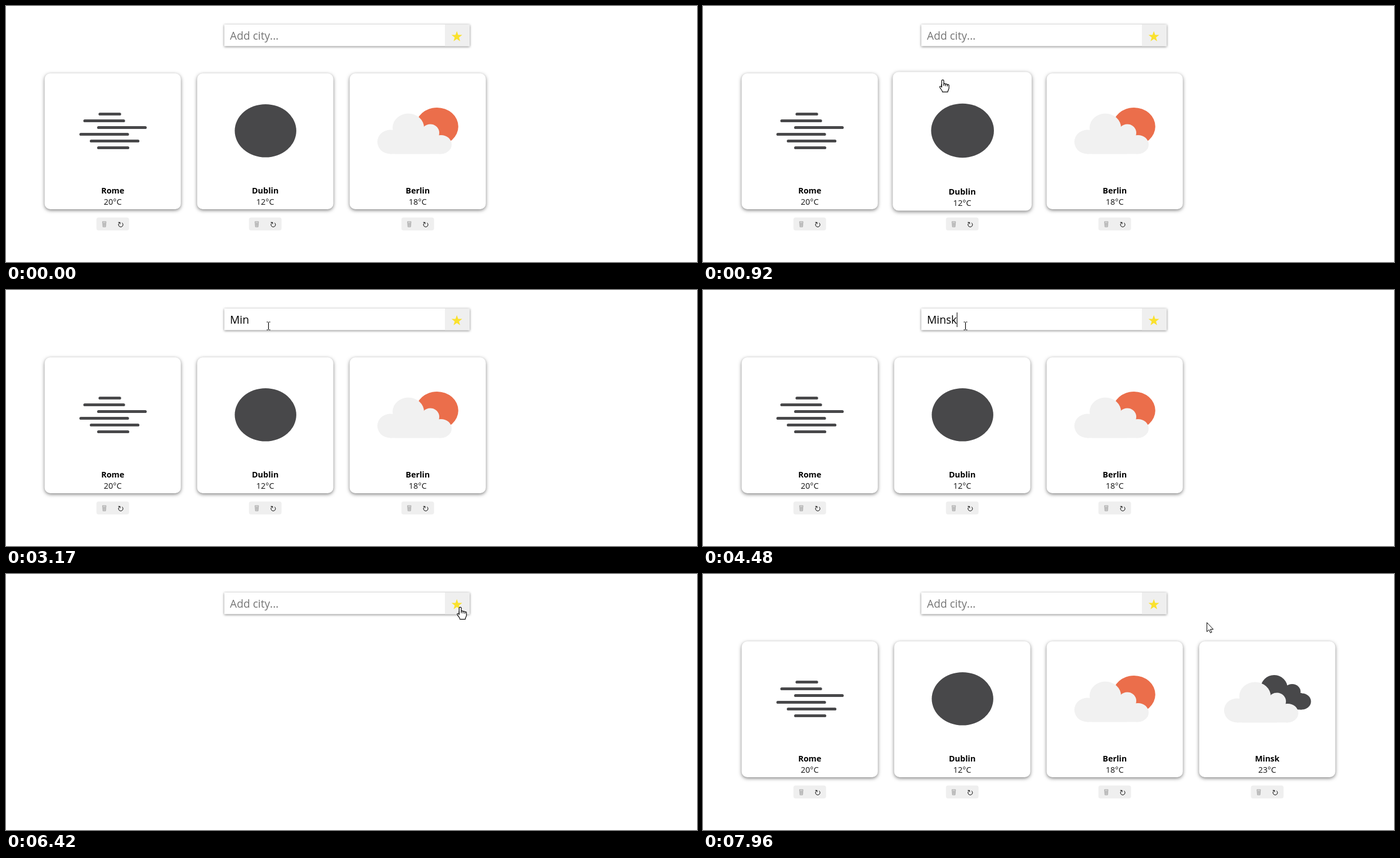
These frames come from a looping animation (1228 by 456 pixels, 8 s). An HTML page:

```html
<!DOCTYPE html>
<html lang="en">
<head>
<meta charset="utf-8">
<title>City weather</title>
<style>
  html, body { margin: 0; width: 100%; height: 100%; overflow: hidden; background: #fff; }
  svg { display: block; width: 100%; height: 100%; font-family: "Open Sans", sans-serif; font-kerning: none; }
  .panel { fill: #fff; filter: drop-shadow(0 2px 3.4px rgba(0, 0, 0, .5)); }
  .field { fill: #fff; filter: drop-shadow(0 1.5px 2.3px rgba(0, 0, 0, .5)); }
  .grey { fill: #efefef; }
  .dark { fill: #48484a; }
  .pale { fill: #f1f1f1; }
  .sun { fill: #eb6e4b; }
  .fog { stroke: #48484a; stroke-width: 5.2; stroke-linecap: round; }
  .label { font-size: 14.4px; text-anchor: middle; fill: #111; }
  .name { font-weight: 700; fill: #000; }
  .entry { font-size: 19.2px; }
  .line { fill: none; stroke: #000; }
  .bin { fill: #d8d8d8; stroke: #999; stroke-width: .8; }
  .pointer { fill: #fff; stroke: #000; stroke-linejoin: round; }
</style>
</head>
<body>
<svg viewBox="0 0 1228 456">
  <rect class="field" x="388" y="33" width="436" height="38.5"/>
  <rect class="grey" x="780" y="33" width="44" height="38.5"/>
  <polygon id="star" fill="#fae12d"/>
  <text id="entry" class="entry" x="398" y="60"></text>
  <rect id="caret" y="40" width="1" height="26"/>
  <g id="cards"></g>
  <g id="cursor">
    <path id="arrow" class="pointer" d="M0 0V16.3L3.8 12.8L6.2 18.3L8.6 17.3L6.2 12H11.3Z"/>
    <g id="hand" class="pointer" stroke-width="1.2">
      <path d="M-2 2C-2 -.2 1.8 -.2 1.8 2V8C2 6.5 5 6.6 5 8.5C5.3 7.2 8 7.4 8.2 9.2C8.6 8.2 11 8.4 11 10.5V15C11 17 9 19 8.8 22H-.5C-.8 19 -3.5 17 -5.2 13.8C-6.3 11.6 -3.8 10.8 -2 13.5Z"/>
      <path class="line" d="M-2 12V8M1.8 8V11M5 8.5V11.5M8.2 9.2V12"/>
    </g>
    <path id="beam" class="line" stroke-width="1.2" d="M-3.2 -7H-.8M.8 -7H3.2M0 -6.5V6.5M-3.2 7H-.8M.8 7H3.2"/>
  </g>
</svg>
<script>
const LOOP = 8000, STEP = 76.5, BLINK = 535;
const PITCH = 271, MID = 189.7, CARD = { x: 68.7, y: 120, size: 242 };
const CLICK = 1460, SUBMIT = 6030, CLEAR = 6260, RELOAD = 6570;
const $ = id => document.getElementById(id);

const ellipse = (cls, cx, cy, rx, ry) =>
  `<ellipse class="${cls}" cx="${cx}" cy="${cy}" rx="${rx}" ry="${ry}"/>`;
const box = (cls, x, y, w, h, r = 0) =>
  `<rect class="${cls}" x="${x}" y="${y}" width="${w}" height="${h}" rx="${r}"/>`;

const cloud = (dx, dy) => `<g transform="translate(${dx} ${dy})">` +
  ellipse('pale', 141, 242, 23, 21.5) + ellipse('pale', 173, 217, 28, 25.5) +
  ellipse('pale', 212, 226, 16, 15.5) + ellipse('pale', 231, 246.7, 19, 16.8) +
  box('pale', 150, 222, 62, 41.5) + box('pale', 141, 234, 90, 29.5) + '</g>';

// Bars as [left end, length].
const mist = () => [[167, 35], [140, 69], [164.5, 83], [133, 83], [151.5, 83], [164.5, 52]]
  .map(([x, w], i) => `<path class="fog" d="M${x} ${192.5 + 12 * i}h${w}"/>`).join('');
const moon = () => ellipse('dark', 190.2, 222.3, 54.7, 47.3);
const sunny = () => ellipse('sun', 224, 214.7, 37.8, 33.7) + cloud(0, 0);
const cloudy = () => ellipse('dark', 202, 204, 24, 24) + ellipse('dark', 234, 210, 15, 14) +
  ellipse('dark', 251, 227, 16.5, 14.5) + box('dark', 202, 212, 49, 29.5) + cloud(-5, 1);

const cities = [['Rome', 20, mist], ['Dublin', 12, moon], ['Berlin', 18, sunny], ['Minsk', 23, cloudy]];

$('cards').innerHTML = cities.map(([name, degrees, icon], i) => `
  <g transform="translate(${PITCH * i} 0)">
    <g class="body">
      ${box('panel', CARD.x, CARD.y, CARD.size, CARD.size, 10)}
      ${icon()}
      <text class="label name" x="${MID}" y="334">${name}</text>
      <text class="label" x="${MID}" y="354">${degrees}°C</text>
    </g>
    ${box('grey', 160.7, 376.7, 58, 23, 4)}
    <path class="bin" d="M171.5 384H177.8L177 393.5H172.3ZM173.7 386V392M175.7 386V392"/>
    <path class="line" d="M206.3 386.3A4 4 0 1 1 201.7 386.2M199.5 385.4H202.8V388.4"/>
  </g>`).join('');

const groups = [...$('cards').children];
const bodies = groups.map(g => g.querySelector('.body'));

$('star').setAttribute('points', Array.from({ length: 10 }, (_, i) => {
  const r = i % 2 ? 4 : 10, a = Math.PI * (i / 5 - .5);
  return `${801.2 + r * Math.cos(a)},${54.7 + r * Math.sin(a)}`;
}).join(' '));

// Pointer strokes: each curves from the previous end, bending towards `via`.
const strokes = [
  { at: 230, steps: 11, via: [357, 275], to: [432, 99] },
  { at: 1070, steps: 7, via: [480, 60], to: [466.5, 64] },
  { at: 5260, steps: 5, to: [853, 75] },
  { at: 5650, steps: 6, via: [801, 45], to: [805, 53.5] },
  { at: CLEAR, steps: 1, to: [807.3, 58.7] },
  { at: 7200, steps: 2, to: [819.5, 49.5] },
  { at: 7730, steps: 4, to: [895.5, 86.5] }
];
strokes.reduce((from, s) => {
  s.from = from;
  s.via = s.via || from.map((v, i) => (v + s.to[i]) / 2);
  return s.to;
}, [1222, 477]);

function pointerAt(t) {
  const s = strokes.filter(s => s.at <= t).pop();
  if (!s) return null;
  const done = Math.floor((t - s.at + 8) / STEP) + 1;
  const u = Math.min(1, done / s.steps), v = 1 - u;
  return s.from.map((a, i) => v * v * a + 2 * v * u * s.via[i] + u * u * s.to[i]);
}

const keys = [2300, 2470, 2620, 3780, 3950];

function caretAt(t) {
  if (t < CLICK || t >= SUBMIT) return false;
  const last = Math.max(CLICK, ...keys.filter(k => k <= t));
  return Math.floor((t - last) / BLINK) % 2 === 0;
}

const clamp = v => Math.min(1, Math.max(0, v));
const fadeAt = t => Math.max(clamp(1 - (t - CLEAR) / 160), clamp((t - RELOAD + 8) / 80));

const inside = (p, x, y, w, h) => p && p[0] >= x && p[0] < x + w && p[1] >= y && p[1] < y + h;
const show = (el, on) => el.setAttribute('visibility', on ? 'visible' : 'hidden');

function drawCards(t, p) {
  const count = t < RELOAD ? 3 : 4;
  $('cards').setAttribute('opacity', fadeAt(t));
  return groups.filter((g, i) => {
    const over = i < count && inside(p, CARD.x + PITCH * i, CARD.y, CARD.size, CARD.size);
    show(g, i < count);
    bodies[i].setAttribute('transform',
      over ? `translate(${MID} 241) scale(1.02) translate(${-MID} -241)` : '');
    return over;
  }).length > 0;
}

function drawField(t) {
  const typed = t < CLEAR ? 'Minsk'.slice(0, keys.filter(k => k <= t).length) : '';
  const entry = $('entry');
  entry.textContent = typed || 'Add city...';
  entry.setAttribute('fill', typed ? '#000' : '#757575');
  $('caret').setAttribute('x', Math.floor(398 + (typed && entry.getComputedTextLength())));
  show($('caret'), caretAt(t));
}

function draw(t) {
  const p = pointerAt(t);
  const overCard = drawCards(t, p);
  drawField(t);
  const overField = inside(p, 388, 33, 392, 39);
  const overStar = inside(p, 780, 33, 44, 39);
  const shape = overField ? 'beam' : overCard || overStar ? 'hand' : 'arrow';
  ['arrow', 'hand', 'beam'].forEach(id => show($(id), p && id === shape));
  if (p) $('cursor').setAttribute('transform', `translate(${p[0]} ${p[1]})`);
}

const began = performance.now();
function tick() {
  draw((performance.now() - began) % LOOP);
  requestAnimationFrame(tick);
}
tick();
</script>
</body>
</html>
```
